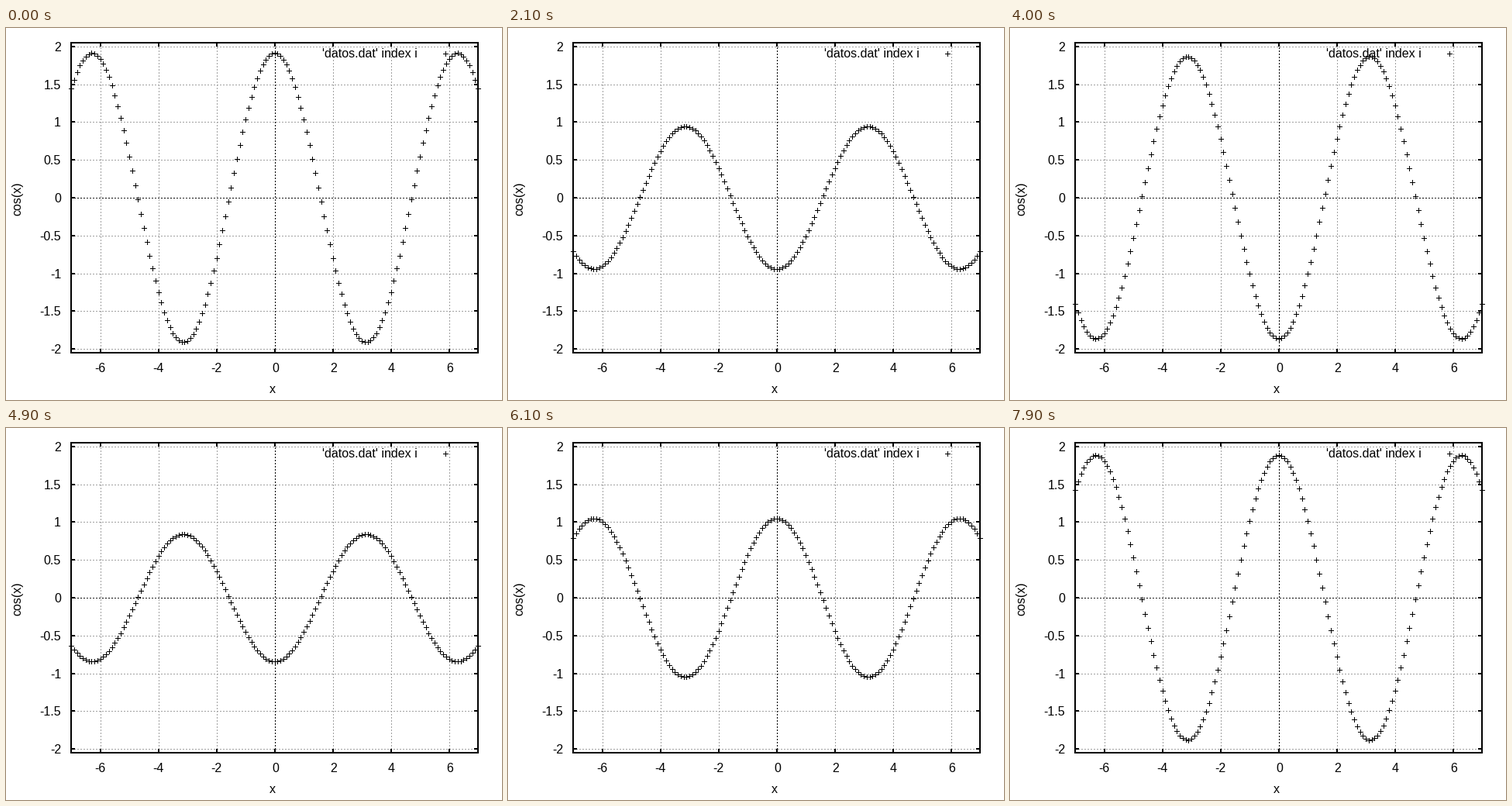
These frames come from a looping animation (640 by 480 pixels, 8 s). A matplotlib script:

```python
import numpy as np
import matplotlib.pyplot as plt
from matplotlib.animation import FuncAnimation

plt.rcParams.update({"font.family": "Liberation Sans", "path.simplify": False})

W, H, DPI = 640, 480, 80
PX = 72 / DPI                      # one pixel in points
LEFT, RIGHT, TOP, BOTTOM = 84, 609, 19, 419
X_MAX, Y_MAX = 7, 2.05
FRAMES, INTERVAL = 80, 100
GREY = "#a0a0a0"

fig = plt.figure(figsize=(W / DPI, H / DPI), dpi=DPI, facecolor="white")
ax = fig.add_axes([0, 0, 1, 1])
ax.set(xlim=(0, W), ylim=(H, 0))
ax.axis("off")


def col(x):
    return LEFT + np.floor((np.asarray(x) + X_MAX) * 37.5 + 0.5 + 1e-6)


def row(y):
    scale = (BOTTOM - TOP) / (2 * Y_MAX)
    return BOTTOM - np.floor((np.asarray(y) + Y_MAX) * scale + 0.5)


def line(xs, ys, width=1, color="black", **kw):
    return ax.plot(xs, ys, color=color, lw=width * PX, snap=False,
                   solid_capstyle="butt", **kw)[0]


def dotted(xs, ys, color, z):
    line(xs, ys, color=color, ls=(0, (2, 2)), zorder=z)


def label(x, y, s, ha="center", **kw):
    ax.text(x, y, s, ha=ha, va="baseline", fontsize=16 * PX, zorder=5, **kw)


def crosses(cols, rows):
    """Seven-pixel plus signs as one path with gaps."""
    gap = np.full_like(cols, np.nan)
    mid_x, mid_y = cols + 0.5, rows + 0.5
    xs = np.column_stack([cols - 3, cols + 4, gap, mid_x, mid_x, gap])
    ys = np.column_stack([mid_y, mid_y, gap, rows - 3, rows + 4, gap])
    return xs.ravel(), ys.ravel()


# Grid, tics and tic labels
for v in range(-6, 7, 2):
    c = float(col(v))
    dotted([c + 0.5] * 2, [BOTTOM, TOP], GREY, 1)
    line([c, c], [TOP, TOP + 5], 2, zorder=3)
    line([c, c], [BOTTOM, BOTTOM - 5], 2, zorder=3)
    label(c + (-1 if v < 0 else 0.5), 444, str(v))

for v in np.arange(-2, 2.1, 0.5):
    r = float(row(v))
    dotted([LEFT, RIGHT], [r + 0.5] * 2, GREY, 1)
    line([LEFT, LEFT + 5], [r, r], 2, zorder=3)
    line([RIGHT, RIGHT - 5], [r, r], 2, zorder=3)
    label(71, r + 6, f"{v:g}", ha="right")

# Zero axes and border
dotted([LEFT, RIGHT], [float(row(0)) + 0.5] * 2, "black", 2)
dotted([float(col(0)) + 0.5] * 2, [BOTTOM, TOP], "black", 2)
for y in (TOP, BOTTOM):
    line([LEFT - 1, RIGHT + 1], [y, y], 2, zorder=3)
for x in (LEFT, RIGHT):
    line([x, x], [TOP - 1, BOTTOM + 1], 2, zorder=3)

# Axis titles and key
label(344, 471, "x")
ax.text(19, 220, "cos(x)", rotation=90, rotation_mode="anchor", ha="center",
        va="baseline", fontsize=16 * PX)
label(408.5, 38.5, "'datos.dat' index i", ha="left")
line(*crosses(np.array([567.0]), np.array([33.0])), zorder=4)

grid_x = np.arange(-70, 71) / 10
cols = col(grid_x)
wave = line([], [], zorder=4)


def update(i):
    amp = Y_MAX * np.cos(0.08 * i + 0.369)
    wave.set_data(*crosses(cols, row(amp * np.cos(grid_x))))
    return [wave]


anim = FuncAnimation(fig, update, frames=FRAMES, interval=INTERVAL,
                     repeat=True, repeat_delay=0)
plt.show()
```
